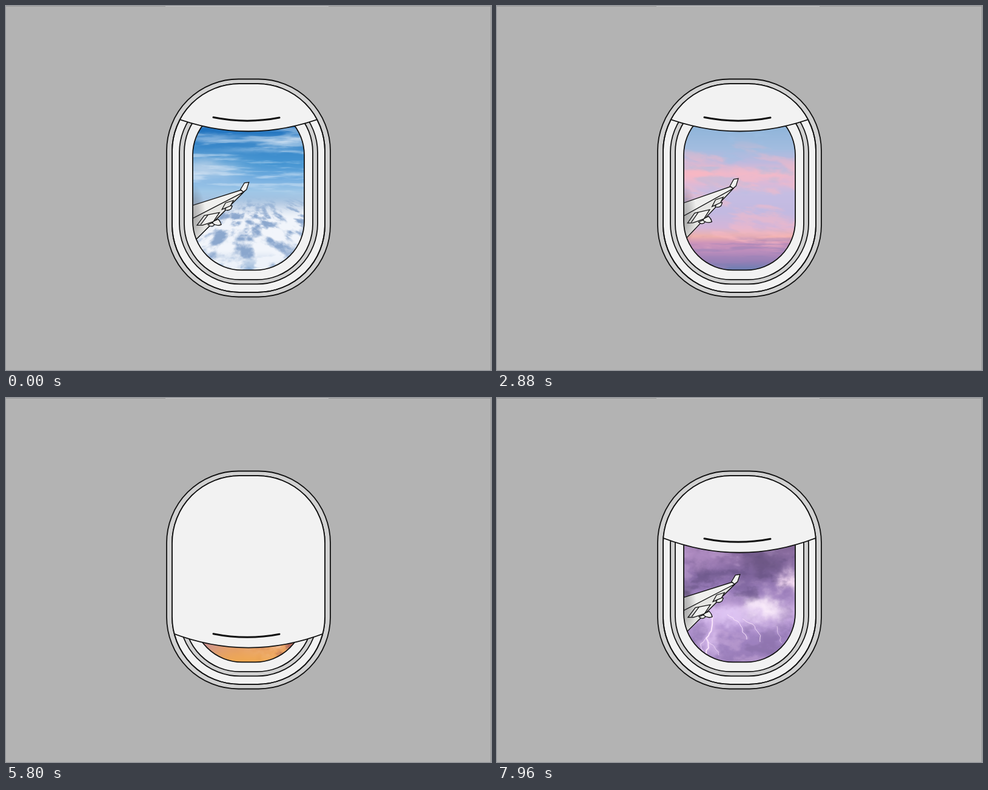
An HTML page with a canvas that plays this animation: 800 px wide and 600 px high, repeating every 8000 ms.

```html
<!DOCTYPE html>
<html lang="en">
<head>
<meta charset="utf-8">
<title>Window seat</title>
<style>
  html, body { margin: 0; width: 100%; height: 100%; overflow: hidden; background: #b3b3b3; }
  canvas { display: block; width: 800px; height: 600px; }
</style>
</head>
<body>
<canvas id="stage" width="800" height="600"></canvas>
<script>
const LOOP = 8000, STEP = 40, CYCLE = 2400;
const SKY = { x: 306, y: 163, w: 188, h: 274 };
const INK = '#111', PANEL = '#f2f2f2', RIM = '#d1d1d1';
const ctx = document.getElementById('stage').getContext('2d');

const clamp = v => Math.min(1, Math.max(0, v));
const smooth = v => { v = clamp(v); return v * v * (3 - 2 * v); };
const ramp = (a, b, v) => smooth((v - a) / (b - a));
const rgb = hex => [0, 2, 4].map(i => parseInt(hex.slice(i, i + 2), 16));
const mix = (a, b, k) => a.map((v, i) => v + (b[i] - v) * k);

function randomizer(seed) {
  return () => {
    seed = (Math.imul(seed, 1664525) + 1013904223) >>> 0;
    return seed / 4294967296;
  };
}

const lattice = Float32Array.from({ length: 65536 }, randomizer(17));
function noise(x, y) {
  const i = Math.floor(x), j = Math.floor(y);
  const u = smooth(x - i), v = smooth(y - j);
  const at = (a, b) => lattice[(a & 255) + ((b & 255) << 8)];
  const top = at(i, j) + (at(i + 1, j) - at(i, j)) * u;
  const low = at(i, j + 1) + (at(i + 1, j + 1) - at(i, j + 1)) * u;
  return top + (low - top) * v;
}
function fbm(x, y) {
  let sum = 0, amp = 0.5;
  for (let k = 0; k < 5; k++, amp /= 2) {
    sum += amp * noise(x, y);
    x = x * 2 + 13.7;
    y = y * 2 + 7.3;
  }
  return sum;
}

// Vertical colour ramp written as "y hex, y hex, ..."
function gradient(text) {
  const stops = text.split(', ').map(s => s.split(' ')).map(([y, c]) => [+y, rgb(c)]);
  return y => {
    let i = 0;
    while (i < stops.length - 2 && y > stops[i + 1][0]) i++;
    const [a, b] = [stops[i], stops[i + 1]];
    return mix(a[1], b[1], clamp((y - a[0]) / (b[0] - a[0])));
  };
}
function glow(cx, cy, rx, ry, hex, strength) {
  const color = rgb(hex);
  return (c, x, y) => mix(c, color,
    strength * Math.exp(-(((x - cx) / rx) ** 2) - ((y - cy) / ry) ** 2));
}
const applyGlows = (glows, c, x, y) => glows.reduce((acc, g) => g(acc, x, y), c);

function paintSky(shade, details) {
  const canvas = document.createElement('canvas');
  canvas.width = SKY.w;
  canvas.height = SKY.h;
  const g = canvas.getContext('2d');
  const image = g.createImageData(SKY.w, SKY.h);
  for (let j = 0, p = 0; j < SKY.h; j++) {
    for (let i = 0; i < SKY.w; i++, p += 4) {
      image.data.set([...shade(i + SKY.x, j + SKY.y), 255], p);
    }
  }
  g.putImageData(image, 0, 0);
  g.translate(-SKY.x, -SKY.y);
  if (details) details(g);
  return canvas;
}

const WHITE = rgb('f8fafe');

function daySky() {
  const base = gradient('195 1a6dbb, 230 3585c8, 260 4595d2, 285 74aee0, 305 9fc7e7, 325 a4bfdd, 345 b4c6de, 400 bccce2, 435 7aa2ce');
  const shadow = rgb('86a3cb');
  const glows = [
    glow(325, 268, 55, 20, 'd3dfee', 0.75),
    glow(465, 221, 45, 7, 'd3e2f2', 0.75),
    glow(335, 217, 45, 6, 'b4d0ec', 0.6),
    glow(420, 236, 60, 4, 'a9cbea', 0.5)
  ];
  return paintSky((x, y) => {
    const sway = (fbm(x / 30, y / 12) - 0.5) * 12;
    let c = applyGlows(glows, base(y), x, y + sway);
    const cirrus = fbm(x / 60, y / 6);
    c = mix(c, WHITE, 0.4 * ramp(0.46, 0.72, cirrus) * (1 - ramp(285, 320, y)));
    const depth = ramp(312, 352, y);
    if (depth > 0) {
      // Perspective: the lumps grow as the cloud floor comes closer
      const size = 5 + (y - 312) * 0.16;
      const u = (x - 400) / size + 60, v = 8.5 * Math.log(size);
      const billow = 1 - Math.abs(2 * noise(u * 0.7, v * 0.7) - 1);
      const lump = 0.75 * fbm(u, v) + 0.25 * billow + 0.15 * (fbm(u, v + 0.5) - fbm(u, v - 0.3));
      const gap = ramp(400, 432, y) * ramp(0.42, 0.6, fbm(x / 25 + 9, y / 14));
      c = mix(c, mix(shadow, WHITE, ramp(0.3, 0.62, lump)), depth * (0.9 - 0.6 * gap));
    }
    return c;
  });
}

function duskSky() {
  const base = gradient('195 8db4d9, 235 a2bcdf, 258 bfb9de, 276 ebb9cd, 292 dab9d8, 308 c5bde2, 340 c2b9e1, 365 d4b5d8, 379 efb1ac, 390 cd94ba, 405 b98cbc, 420 967fb5, 435 6b7fb2');
  const rose = rgb('f9b9c4'), slate = rgb('9b83b8'), blue = rgb('9fbfe3');
  const left = glow(330, 275, 45, 16, 'fdb6bf', 0.7);
  return paintSky((x, y) => {
    let c = left(base(y), x, y);
    const cloud = fbm(x / 45, (y - x * 0.15) / 14);
    c = mix(c, rose, 0.5 * ramp(0.48, 0.7, cloud) * ramp(205, 265, y) * (1 - ramp(385, 410, y)));
    c = mix(c, blue, 0.5 * ramp(0.5, 0.7, fbm(x / 50 + 30, y / 18)) * (1 - ramp(250, 350, y)));
    return mix(c, slate, 0.55 * ramp(0.46, 0.65, fbm(x / 60 + 70, y / 6)) * ramp(372, 392, y));
  });
}

function starSky() {
  const base = gradient('195 28232f, 230 35262f, 250 402a3c, 268 48325a, 290 653a50, 318 8a4a5a, 345 a65f68, 365 c37a75, 385 da9271, 410 e6a066, 435 f0a94f');
  const glows = [
    glow(322, 385, 34, 42, 'b98bad', 0.75),
    glow(318, 305, 24, 22, '8a4674', 0.65),
    glow(385, 372, 40, 24, 'edbcb8', 0.65),
    glow(460, 395, 45, 28, 'f2ac68', 0.6)
  ];
  const dust = rgb('8a4355'), gleam = rgb('f7ddd4');
  return paintSky((x, y) => {
    let c = applyGlows(glows, base(y), x, y);
    const band = Math.exp(-(((y - 350 - (x - 375) * 0.6) / 34) ** 2));
    const n = fbm(x / 18, y / 14);
    c = mix(c, dust, band * 0.6 * ramp(0.5, 0.68, n));
    return mix(c, gleam, band * 0.5 * ramp(0.52, 0.34, n));
  }, g => {
    const rand = randomizer(5);
    for (let k = 0; k < 230; k++) {
      const x = SKY.x + rand() * SKY.w, y = 195 + rand() ** 1.2 * 200;
      g.fillStyle = `rgba(255,232,232,${0.2 + 0.6 * rand()})`;
      const size = rand() > 0.9 ? 1.5 : 1;
      g.fillRect(x, y, size, size);
    }
  });
}

function bolt(g, points, width) {
  const rand = randomizer(points[0][0]);
  g.beginPath();
  g.moveTo(...points[0]);
  for (let k = 1; k < points.length; k++) {
    const [a, b] = [points[k - 1], points[k]];
    for (let s = 1; s <= 4; s++) {
      const wobble = s < 4 ? (rand() - 0.5) * 5 : 0;
      g.lineTo(a[0] + (b[0] - a[0]) * s / 4 + wobble, a[1] + (b[1] - a[1]) * s / 4);
    }
  }
  g.lineWidth = width;
  g.stroke();
}

function stormSky() {
  const base = gradient('195 43364f, 225 62497a, 255 80639a, 290 7d62a2, 320 8f74b6, 350 c4a6e0, 372 b093d4, 395 9379bb, 435 8a70b0');
  const dark = rgb('4f3e72'), pale = rgb('c4a6d8');
  const glows = [
    glow(435, 210, 65, 20, '2a242c', 1),
    glow(330, 215, 25, 16, '5c4674', 0.6),
    glow(335, 258, 38, 20, 'b08cc6', 0.8),
    glow(440, 272, 34, 26, '4c3c6a', 0.75),
    glow(362, 292, 36, 9, '56457a', 0.7),
    glow(405, 310, 20, 18, '5d4a84', 0.5),
    glow(480, 300, 14, 14, 'fbe4f8', 0.95),
    glow(436, 348, 32, 18, 'fff6ff', 1),
    glow(375, 358, 50, 14, 'e2ccfb', 0.85),
    glow(350, 402, 17, 28, 'd9c0f2', 0.75),
    glow(470, 330, 18, 14, '7e62a8', 0.5)
  ];
  return paintSky((x, y) => {
    const n = fbm(x / 28, y / 18);
    let c = mix(base(y), dark, 0.6 * ramp(0.48, 0.28, n) * (1 - 0.6 * ramp(320, 350, y)));
    c = mix(c, pale, 0.5 * ramp(0.5, 0.72, n) * ramp(205, 255, y));
    const warpX = fbm(x / 16 + 50, y / 14) - 0.5;
    const warpY = fbm(x / 16 + 90, y / 14) - 0.5;
    return applyGlows(glows, c, x + warpX * 36, y + warpY * 30);
  }, g => {
    g.strokeStyle = '#fbeaff';
    g.shadowColor = '#e6c8ff';
    g.shadowBlur = 5;
    bolt(g, [[356, 360], [354, 380], [345, 396], [349, 412], [343, 428]], 2);
    bolt(g, [[345, 396], [336, 408], [340, 418]], 0.9);
    bolt(g, [[349, 402], [360, 413], [366, 424]], 0.7);
    bolt(g, [[380, 357], [397, 368], [405, 382], [412, 398]], 1);
    bolt(g, [[405, 364], [422, 373], [432, 388], [434, 402]], 0.9);
    bolt(g, [[462, 376], [466, 392], [470, 404]], 0.6);
  });
}

const skies = [daySky(), duskSky(), starSky(), stormSky()];

function pane(left, top, radius) {
  const path = new Path2D();
  path.roundRect(left, top, 800 - 2 * left, 600 - 2 * top, radius);
  return path;
}
const rings = [
  [pane(265, 120.5, 118.5), RIM],
  [pane(274, 128.2, 111), PANEL],
  [pane(286, 141.6, 100), RIM],
  [pane(294, 148.8, 92), PANEL]
];
const shadeFrame = rings[1][0];
const glass = pane(308, 164.6, 81);

function outline(path, fill, width = 1.8) {
  if (fill) {
    ctx.fillStyle = fill;
    ctx.fill(path);
  }
  ctx.strokeStyle = INK;
  ctx.lineWidth = width;
  ctx.stroke(path);
}

const wing = [
  ['M290 334L387 303L392 306L300 398Z', '#f0f0ee'],
  ['M290 359L392 306L300 398Z', '#e6e6e3'],
  ['M393 291L400.5 290L396.5 302L391.5 306L386.5 302Z', '#f0f0ee'],
  ['M361 335Q366 338 371 334L373 329L366 328Z', '#f0f0ee'],
  ['M356 335L362 324L375 320L370 329Z', '#e6e6e3'],
  ['M333 360Q338 365 343 361L345 355Z', '#f0f0ee'],
  ['M341 355L350 351Q354 355 355 360Q348 363 341 358Z', '#f0f0ee'],
  ['M315 361L327 345L352 340L342 355L324 361Z', '#f0f0ee'],
  ['M321 360L333 344']
].map(([d, fill]) => [new Path2D(d), fill]);

function drawWing(t) {
  const tip = 288.7 + 4.5 * Math.cos(2 * Math.PI * (t - 720) / 3960);
  ctx.save();
  ctx.translate(193, 380);
  ctx.rotate((tip - 290) / 207);
  ctx.translate(-193, -380);
  for (const [path, fill] of wing) outline(path, fill, 1.3);
  ctx.restore();

  ctx.save();
  ctx.translate(306, 344);
  ctx.scale(0.45, 1);
  const soft = ctx.createRadialGradient(0, 0, 0, 0, 0, 52);
  soft.addColorStop(0, 'rgba(60,60,65,.42)');
  soft.addColorStop(0.5, 'rgba(60,60,65,.25)');
  soft.addColorStop(1, 'rgba(60,60,65,0)');
  ctx.fillStyle = soft;
  ctx.fillRect(-60, -60, 120, 120);
  ctx.restore();
}

const shade = new Path2D('M260 -200V182.5H274Q400 230.5 526 182.5H540V-200Z');
const handle = new Path2D('M342 183.5Q397 194.5 451 184');

function drawShade(t) {
  const u = (t - 615 + CYCLE) % CYCLE;
  const shut = u < 545 ? smooth(u / 500) : 1 - smooth((u - 545) / 480);
  ctx.save();
  ctx.clip(shadeFrame);
  ctx.translate(0, 237 * shut);
  outline(shade, PANEL);
  ctx.lineCap = 'round';
  outline(handle, null, 3);
  ctx.restore();
  outline(shadeFrame);
}

function draw(t) {
  ctx.fillStyle = '#b3b3b3';
  ctx.fillRect(0, 0, 800, 600);
  ctx.fillStyle = '#999';
  ctx.fillRect(0, 0, 800, 1);
  ctx.fillRect(799, 0, 1, 600);
  ctx.fillStyle = '#c0c0c0';
  ctx.fillRect(263, 0, 269, 1);

  for (const [path, fill] of rings) outline(path, fill);

  ctx.save();
  ctx.clip(glass);
  const scene = Math.floor((t - 1140) / CYCLE) + 1;
  ctx.drawImage(skies[scene], SKY.x, SKY.y);
  if (t >= 7000) {
    ctx.fillStyle = 'rgba(225,185,220,.15)';
    ctx.fillRect(SKY.x, SKY.y, SKY.w, SKY.h);
  }
  drawWing(t);
  ctx.restore();
  outline(glass);
  drawShade(t);
}

function tick() {
  draw(Math.floor(performance.now() % LOOP / STEP) * STEP);
  requestAnimationFrame(tick);
}
tick();
</script>
</body>
</html>
```
